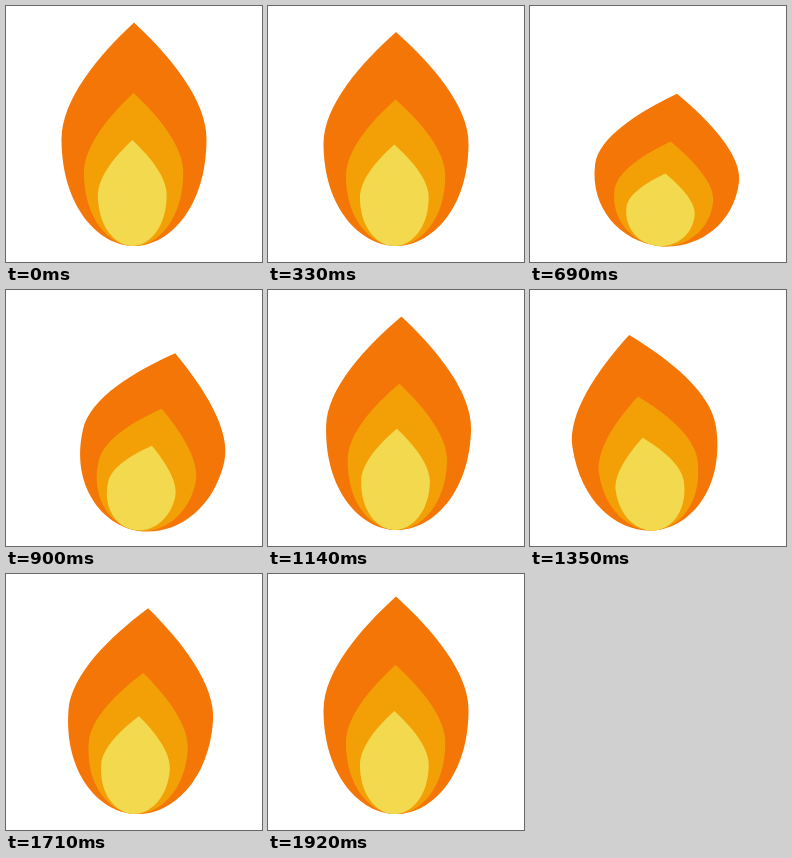
An HTML page that plays this animation: 256x256 px, repeating every 1.95 s.

```html
<!DOCTYPE html>
<html lang="en">
<head>
<meta charset="utf-8">
<title>Flame</title>
<style>
  html, body { margin: 0; width: 100%; height: 100%; overflow: hidden; background: #fff; }
  svg { display: block; width: 100%; height: 100%; }
</style>
</head>
<body>
<svg viewBox="0 0 256 256">
  <defs>
    <!-- one tongue, base at the origin -->
    <path id="tongue" d="M0-223.5C-36-190-72.5-146-72.5-107C-72.5-40-36 0 0 0C36 0 72.5-40 72.5-107C72.5-146 36-190 0-223.5Z"/>
  </defs>
  <g id="flame">
    <use href="#tongue" fill="#f47606"/>
    <use href="#tongue" fill="#f3a007" transform="translate(-.4) scale(.685)"/>
    <use href="#tongue" fill="#f2d94e" transform="translate(-1.7) scale(.474)"/>
  </g>
</svg>
<script>
  const STEP = 30, STEPS = 65;
  // [step, value] pairs, linear in between
  const stretch = [[0, 1], [10, 1], [19, .615], [39, .974], [47, .852], [64, .973]];
  const tilt = [[0, 0], [19, 0], [28, 16], [39, 0], [47, -11.2], [54, 5.6], [64, 0]];

  const flame = document.getElementById('flame');

  function valueAt(keys, n) {
    const i = keys.findIndex(([at]) => at >= n);
    if (i <= 0) return keys[0][1];
    const [a, from] = keys[i - 1], [b, to] = keys[i];
    return from + (to - from) * (n - a) / (b - a);
  }

  function draw(ms) {
    const n = Math.floor(ms / STEP) % STEPS;
    flame.setAttribute('transform',
      `translate(128 240) rotate(${valueAt(tilt, n)}) scale(1 ${valueAt(stretch, n)})`);
  }

  const start = performance.now();
  function tick() {
    draw(performance.now() - start);
    requestAnimationFrame(tick);
  }
  tick();
</script>
</body>
</html>
```
